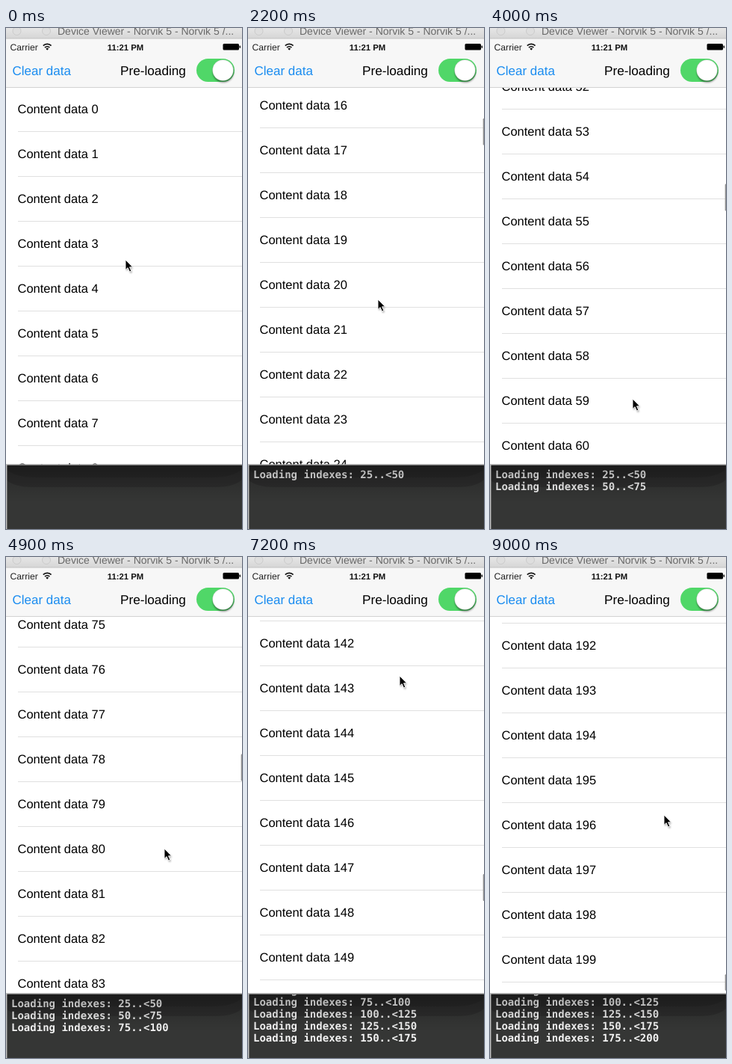
Recreate the animation shown at these times as an HTML page. Size 316 by 670 pixels, loop 9100 ms.

```html
<!DOCTYPE html>
<html lang="en">
<head>
<meta charset="utf-8">
<title>Pre-loading list</title>
<style>
  html, body { margin: 0; width: 100%; height: 100%; overflow: hidden; background: #fff; }
  svg { display: block; width: 316px; height: 670px; }
  text { font-family: "Liberation Sans", Arial, sans-serif; white-space: pre; text-rendering: geometricPrecision; }
  #log text { font: bold 14px "DejaVu Sans Mono", monospace; fill: #f4f4f4; }
</style>
</head>
<body>
<svg viewBox="0 0 316 670">
  <defs>
    <clipPath id="listClip"><rect y="80" width="316" height="504"/></clipPath>
    <clipPath id="logClip"><rect y="585" width="316" height="85"/></clipPath>
    <linearGradient id="titleFill" x2="0" y2="1">
      <stop stop-color="#e6e6e6"/><stop offset="1" stop-color="#d6d6d6"/>
    </linearGradient>
    <linearGradient id="shade" gradientUnits="userSpaceOnUse" x1="0" y1="585" x2="0" y2="634">
      <stop stop-opacity=".3"/><stop offset=".55" stop-opacity=".12"/><stop offset="1" stop-opacity="0"/>
    </linearGradient>
    <filter id="soft" x="-50%" y="-50%" width="200%" height="200%"><feGaussianBlur stdDeviation="1.3"/></filter>
  </defs>

  <rect width="316" height="670" fill="#fff"/>
  <g id="list" clip-path="url(#listClip)" font-size="16.5"></g>
  <rect id="bar" x="314.7" width="3" rx="1.4" fill="#8e8e8e"/>

  <rect y="14" width="316" height="65" fill="#f7f7f7"/>
  <rect y="79" width="316" height="1" fill="#d2d2d2"/>
  <rect width="316" height="14" fill="url(#titleFill)"/>
  <rect y="13.5" width="316" height="1" fill="#c4c4c4"/>
  <g fill="#dedede" stroke="#cbcbcb">
    <circle cx="14.5" cy="4" r="5.5"/><circle cx="54" cy="4" r="5.5"/>
  </g>
  <text x="69" y="9" font-size="14" fill="#686868">Device Viewer - Norvik 5 - Norvik 5 /...</text>

  <text x="5.5" y="29.5" font-size="12.2" fill="#222">Carrier</text>
  <g fill="none" stroke="#111" stroke-width="1.7">
    <path d="M49.8 23.6a7.6 7.6 0 0 1 10.8 0M52 26.1a4.6 4.6 0 0 1 6.4 0"/>
    <path d="M55.2 29.8l-1.9-2.1a2.7 2.7 0 0 1 3.8 0z" fill="#111" stroke="none"/>
  </g>
  <text x="160" y="29.5" font-size="11.3" font-weight="bold" text-anchor="middle" fill="#111">11:21 PM</text>
  <rect x="290.5" y="21" width="21.5" height="8.5" rx="1.5" fill="#000"/>
  <rect x="312.6" y="23.5" width="1.4" height="3.5" rx=".7" fill="#000"/>

  <text x="8.5" y="63" font-size="17" fill="#1a8cf0">Clear data</text>
  <text x="153" y="62.5" font-size="17.2" fill="#000">Pre-loading</text>
  <rect x="255" y="41" width="51" height="31" rx="15.5" fill="#50d768"/>
  <circle cx="291" cy="59" r="14" opacity=".4" filter="url(#soft)"/>
  <circle cx="290.5" cy="56.5" r="14" fill="#fff" stroke="#000" stroke-opacity=".15" stroke-width=".8"/>

  <rect y="584" width="316" height="86" fill="#353635"/>
  <g fill="#000" opacity=".16">
    <path d="M0 585H316V604Q306 614 280 614H36Q10 614 0 604Z"/>
  </g>
  <path d="M0 585H316V590Q304 601 276 601H40Q12 601 0 590Z" fill="#000" opacity=".1"/>
  <g id="log" clip-path="url(#logClip)"></g>
  <rect y="585" width="316" height="49" fill="url(#shade)"/>
  <rect y="583.3" width="316" height="1.4" fill="#a0a0a0"/>
  <rect y="584" width="1.4" height="86" fill="#c0c0c0"/>

  <g id="cursor">
    <path d="M1 2V15L4 12.3L6.5 18L9 17L6.6 11.5H10.5Z" opacity=".35" filter="url(#soft)"/>
    <path d="M0 0V13.4L3.1 10.6L5.5 16L7.8 15L5.5 9.8H9.6Z" fill="#000" stroke="#fff" stroke-width=".9"/>
  </g>
</svg>
<script>
const LOOP = 9100, STEP = 100, ROW = 60, VIEW = 504, TOTAL = 200;
const MAX_SCROLL = TOTAL * ROW - VIEW;
const DRAG_MS = 300, DRAG_PX = 350;
const PAGE = 25, MARGIN = 11;

// Each flick: start time, list offset, pointer x and y.
const flicks = [
  [860, 0, 137, 512], [2017, 806, 176, 522], [3100, 1904, 167, 522],
  [3950, 3130, 190, 516], [4740, 4390, 207, 518], [5930, 6480, 245, 489],
  [6900, 8163, 198, 509], [7850, 9900, 215, 510], [8700, MAX_SCROLL + 64, 233, 345]
];
const last = flicks[flicks.length - 1];
const wander = [[160, 310], [215, 200], [258, 105], [270, 50], [236, 190], [178, 395], [137, 512]];

const $ = id => document.getElementById(id);
const smooth = x => x * x * (3 - 2 * x);
const mix = (a, b, x) => a + (b - a) * x;

function make(parent, tag, attrs) {
  const el = document.createElementNS("http://www.w3.org/2000/svg", tag);
  for (const key in attrs) el.setAttribute(key, attrs[key]);
  return parent.appendChild(el);
}

const rows = Array.from({ length: 10 }, () => {
  const g = make($("list"), "g", {});
  make(g, "rect", { x: 16, y: 59, width: 300, height: 1, fill: "#e0e0e0" });
  return { g, label: make(g, "text", { x: 15.5, y: 35, fill: "#000" }) };
});
const logLines = Array.from({ length: 7 }, (_, i) => {
  const line = make($("log"), "text", { x: 7 });
  line.textContent = `Loading indexes: ${(i + 1) * PAGE}..<${(i + 2) * PAGE}`;
  return line;
});

// List offset and pointer position at time t.
function pose(t) {
  if (t < flicks[0][0]) {
    const [x, y] = wander[Math.max(0, Math.min(6, Math.floor(t / STEP) - 1))];
    return { scroll: 0, x, y };
  }
  if (t >= last[0]) {
    const scroll = MAX_SCROLL + 64 * Math.exp((last[0] - t) / 197);
    return { scroll, x: last[2], y: last[3] };
  }
  const i = flicks.findIndex(f => f[0] > t) - 1;
  const [start, from, x0, y0] = flicks[i];
  const [end, to, x1, y1] = flicks[i + 1];
  const x = mix(x0, x1, (t - start) / (end - start));
  if (t - start <= DRAG_MS) {
    const moved = DRAG_PX * ((t - start) / DRAG_MS) ** 1.6;
    return { scroll: from + moved, x, y: y0 - moved };
  }
  const u = (t - start - DRAG_MS) / (end - start - DRAG_MS);
  const coast = (1 - Math.exp(-4 * u)) / (1 - Math.exp(-4));
  return { scroll: mix(from + DRAG_PX, to, coast), x, y: mix(y0 - DRAG_PX, y1, smooth(u)) };
}

function render(t) {
  const { scroll, x, y } = pose(t);
  const offset = Math.round(scroll);
  const first = Math.floor(offset / ROW);
  rows.forEach(({ g, label }, k) => {
    const index = first + k;
    g.setAttribute("visibility", index < TOTAL ? "visible" : "hidden");
    g.setAttribute("transform", `translate(0 ${79 + index * ROW - offset})`);
    label.textContent = `Content data ${index}`;
  });

  const over = Math.max(0, scroll - MAX_SCROLL);
  $("bar").setAttribute("y", 82 + 462 * Math.min(1, scroll / MAX_SCROLL) + over);
  $("bar").setAttribute("height", Math.max(8, 36 - over));
  $("bar").setAttribute("visibility", scroll > 0 ? "visible" : "hidden");

  const reach = Math.floor((scroll + VIEW) / ROW) + MARGIN;
  const count = Math.min(logLines.length, Math.floor(reach / PAGE));
  const top = count > 4 ? 648 - 16 * (count - 1) : 602;
  logLines.forEach((line, i) => {
    line.setAttribute("y", top + 16 * i);
    line.setAttribute("visibility", i < count ? "visible" : "hidden");
  });

  $("cursor").setAttribute("transform", `translate(${Math.round(x)} ${Math.round(y)})`);
}

const began = performance.now();
function tick() {
  const t = (performance.now() - began) % LOOP;
  render(Math.floor(t / STEP) * STEP);
  requestAnimationFrame(tick);
}
tick();
</script>
</body>
</html>
```
